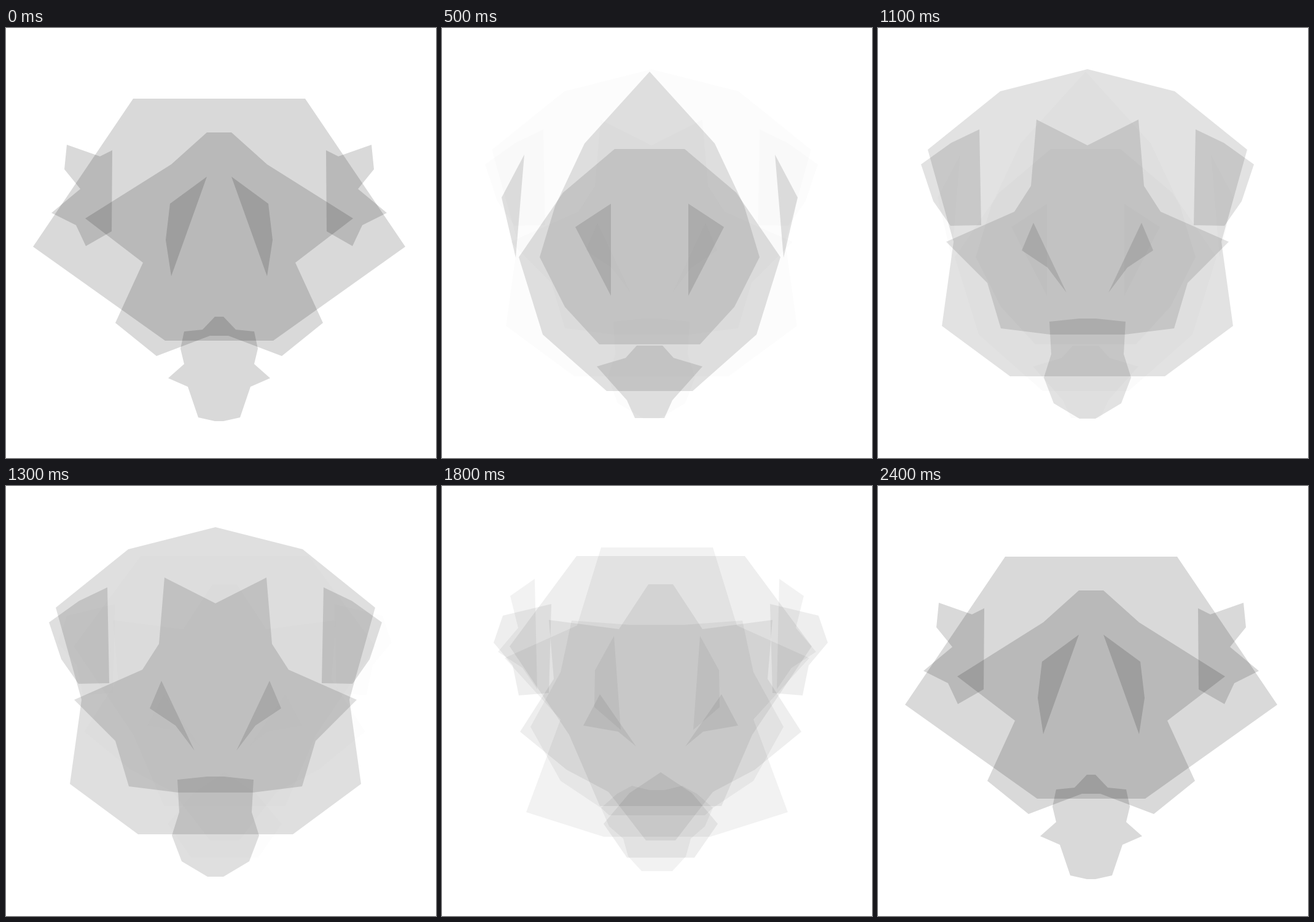
These frames come from a looping animation (700x700 px, 2.5 s). An HTML page with a canvas:

```html
<!DOCTYPE html>
<html lang="en">
<head>
<meta charset="utf-8">
<title>Masks</title>
<style>
html, body { margin: 0; width: 100%; height: 100%; overflow: hidden; background: #fff; }
canvas { display: block; width: 100vw; height: 100vh; }
</style>
</head>
<body>
<canvas id="stage" width="700" height="700"></canvas>
<script>
const ctx = document.getElementById('stage').getContext('2d');
const LOOP = 2500, STEP = 100, INK = 0.15, EASE = 1.35;

// Corners of the left side only; the right side is mirrored on the axis.
// peak: time in ms at which the mask is fully visible.
const masks = [
  {
    peak: 0, axis: 347,
    head: [207,115, 44,356, 259,509],
    face: [327,170, 269,222, 129,310, 223,382, 178,480, 245,534, 332,501],
    mouth: [340,470, 320,491, 290,494, 284,522, 290,547, 264,570, 296,584, 313,634, 340,640],
    ear: [99,190, 153,209, 173,199, 172,331, 130,355, 114,321, 74,301, 121,262, 95,230],
    eye: [327,242, 267,286, 260,345, 269,404]
  },
  {
    peak: 360, axis: 338,
    head: [338,71, 232,188, 184,290, 159,373, 200,454, 256,515],
    face: [281,197, 197,268, 125,373, 164,499, 268,591],
    mouth: [317,517, 299,537, 252,551, 301,606, 314,635],
    ear: [134,206, 97,276, 120,374],
    eye: [217,324, 275,286, 275,436]
  },
  {
    peak: 1260, axis: 341,
    head: [341,67, 199,103, 81,198, 123,348, 104,485, 215,567],
    face: [341,191, 258,149, 249,257, 222,299, 111,348, 178,415, 200,489, 280,499],
    mouth: [327,473, 279,478, 282,531, 270,569, 286,611, 328,636],
    ear: [165,165, 119,187, 70,222, 90,282, 118,322, 168,321],
    eye: [253,317, 234,362, 276,390, 307,431]
  },
  {
    peak: 1600, axis: 356,
    head: [219,114, 110,261, 207,405, 257,521],
    face: [336,160, 288,233, 174,218, 182,314, 127,400, 203,462, 271,498, 332,577],
    mouth: [356,466, 305,500, 263,550, 301,605],
    ear: [178,192, 99,211, 84,255, 115,292, 125,341, 174,337],
    eye: [257,339, 230,390, 287,400, 316,424]
  },
  {
    peak: 2034, axis: 350,
    head: [259,100, 220,227, 102,280, 193,380, 137,531, 263,571],
    face: [306,226, 211,219, 193,303, 144,392, 193,480, 259,524, 272,536],
    mouth: [338,495, 309,488, 285,501, 259,524, 272,554, 295,574, 303,603, 325,627],
    ear: [151,151, 111,179, 124,231, 91,270, 131,296, 155,331],
    eye: [280,244, 249,300, 248,360, 291,397]
  }
];

const toPoints = list =>
  Array.from({ length: list.length / 2 }, (_, i) => [list[2 * i], list[2 * i + 1]]);

const mirror = (points, axis) => points.map(([x, y]) => [2 * axis - x, y]);

function toPath(points) {
  const path = new Path2D();
  points.forEach(([x, y]) => path.lineTo(x, y));
  path.closePath();
  return path;
}

function build({ axis, head, face, mouth, ear, eye }) {
  const whole = [head, face, mouth].map(list => {
    const left = toPoints(list);
    return [...left, ...mirror(left, axis).reverse()];
  });
  const sides = [ear, eye].flatMap(list => {
    const left = toPoints(list);
    return [left, mirror(left, axis)];
  });
  return [...whole, ...sides].map(toPath);
}

masks.forEach(mask => { mask.paths = build(mask); });

// The first mask returns at the end and holds until the loop restarts.
const shows = [...masks, { ...masks[0], peak: LOOP - STEP }];

function draw(now) {
  const time = Math.floor((now % LOOP) / STEP) * STEP;
  const layer = (mask, share) => {
    ctx.globalAlpha = INK * share ** EASE;
    mask.paths.forEach(path => ctx.fill(path));
  };
  ctx.globalAlpha = 1;
  ctx.fillStyle = '#fff';
  ctx.fillRect(0, 0, 700, 700);
  ctx.fillStyle = '#000';

  const next = shows.findIndex(show => show.peak > time);
  if (next < 0) return layer(masks[0], 1);
  const from = shows[next - 1], to = shows[next];
  const progress = (time - from.peak) / (to.peak - from.peak);
  layer(from, 1 - progress);
  layer(to, progress);
}

const start = performance.now();
function tick() {
  draw(performance.now() - start);
  requestAnimationFrame(tick);
}
tick();
</script>
</body>
</html>
```
